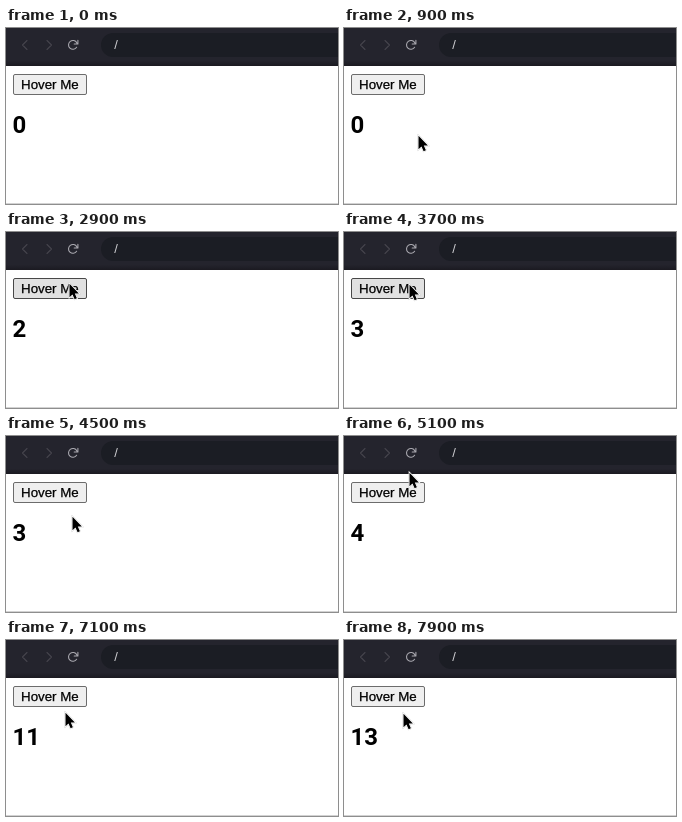
Animation of 332 by 176 pixels, one loop 8 s. Source, as an HTML page:

```html
<!DOCTYPE html>
<html lang="en">
<head>
<meta charset="utf-8">
<title>Hover counter</title>
<style>
  html, body { margin: 0; width: 100%; height: 100%; overflow: hidden; background: #fff; }
  svg { display: block; }
  text { font-family: "Liberation Sans", Arial, sans-serif; }
  .icon { fill: none; stroke-width: 1.1; stroke-linecap: round; stroke-linejoin: round; }
  #label { stroke: #000; stroke-width: .25px; }
  #count { font: bold 24px Roboto, Arial, sans-serif; }
  #button { fill: #efefef; stroke: #6c6c6c; }
  #button.hover { fill: #e1e1e1; stroke: #484848; }
  #cursor { filter: drop-shadow(0 .6px .6px rgba(0, 0, 0, .35)); }
</style>
</head>
<body>
<svg width="332" height="176" viewBox="0 0 332 176">
  <defs>
    <linearGradient id="bar" x2="0" y2="1">
      <stop offset="0" stop-color="#24242d"/>
      <stop offset=".86" stop-color="#24242d"/>
      <stop offset="1" stop-color="#1b1a21"/>
    </linearGradient>
  </defs>
  <rect width="332" height="176" fill="#fff"/>
  <rect width="332" height="38" fill="url(#bar)"/>
  <rect x="95" y="5" width="260" height="24" rx="12" fill="#1b1d24"/>
  <path class="icon" stroke="#45444c" d="M21 12.5l-4.5 4.5 4.5 4.5M41 12.5l4.5 4.5-4.5 4.5"/>
  <path class="icon" stroke="#a9a8af" d="M70.6 19.3A4.4 4.4 0 1 1 70.8 14.8L71.7 16M71.9 12.4V16H68.2"/>
  <text x="108.3" y="21" font-size="13" fill="#cfcfd3">/</text>

  <rect id="button" x="7.5" y="46.5" width="73" height="20" rx="1.5"/>
  <text id="label" x="15" y="61" font-size="13.333">Hover Me</text>
  <text id="count" x="6.6" y="105">0</text>
  <rect y="175" width="332" height="1" fill="#d2d2d2"/>

  <path id="cursor" d="M.5 .8V14.2L3.5 11.4 5.6 16.2 7.9 15.2 5.8 10.5H9.9Z"
        fill="#000" stroke="#fff" stroke-width="1.7" paint-order="stroke"/>
</svg>
<script>
  const LOOP = 8000, STEP = 100, FINE = 10, APPEAR = 100;
  const TOP = 36;

  const point = (t, x, y) => ({ t, x, y });

  // Evenly timed strokes across the button, from one side to the other
  function sweep(from, to, strokes, low, startsLow) {
    return Array.from({ length: strokes }, (_, i) => {
      const atTop = (i % 2 === 0) === startsLow;
      const t = from + (to - from) * (i + 1) / strokes;
      return atTop ? point(t, 62, TOP) : point(t, 59, low);
    });
  }

  // Turning points of the pointer tip
  const path = [
    point(APPEAR, 88, 154),
    point(1750, 58, 55),
    point(2450, 61, 79),
    point(3200, 64, TOP),
    point(4450, 66, 81),
    point(5100, 65, TOP),
    ...sweep(5100, 6200, 5, 80, false),
    ...sweep(6200, 7900, 4, 73, true)
  ];

  const ease = k => (1 - Math.cos(Math.PI * k)) / 2;
  const mix = (a, b, k) => a + (b - a) * k;

  function pointer(t) {
    const i = path.findIndex(p => p.t >= t);
    if (i < 1) return path.at(i);
    const a = path[i - 1], b = path[i];
    const k = ease((t - a.t) / (b.t - a.t));
    return point(t, mix(a.x, b.x, k), mix(a.y, b.y, k));
  }

  const inside = ({ x, y }) => x >= 7 && x < 81 && y >= 46 && y < 67;

  // Each entry into the button adds one
  const entries = [];
  for (let t = FINE; t < LOOP; t += FINE) {
    if (inside(pointer(t)) && !inside(pointer(t - FINE))) entries.push(t);
  }

  const [button, count, cursor] =
    ["button", "count", "cursor"].map(id => document.getElementById(id));

  function draw(t) {
    const tip = pointer(t);
    button.classList.toggle("hover", inside(tip));
    count.textContent = entries.filter(e => e <= t).length;
    cursor.setAttribute("visibility", t < APPEAR ? "hidden" : "visible");
    cursor.setAttribute("transform", `translate(${Math.round(tip.x)} ${Math.round(tip.y)})`);
  }

  const start = performance.now();
  function tick() {
    const t = (performance.now() - start) % LOOP;
    draw(Math.floor(t / STEP) * STEP);
    requestAnimationFrame(tick);
  }
  tick();
</script>
</body>
</html>
```
